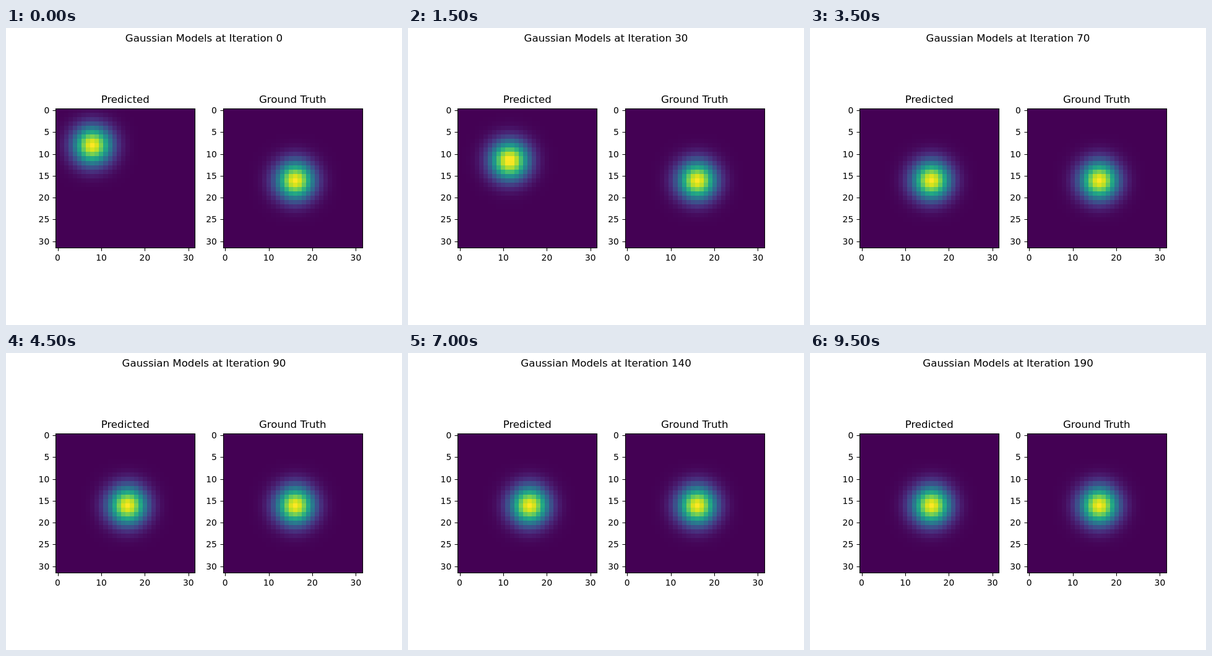
Recreate the animation shown at these times as an HTML page with a canvas. Size 640 px wide and 480 px high, loop 10000 ms.

```html
<!DOCTYPE html>
<html lang="en">
<head>
<meta charset="utf-8">
<title>Gaussian Models</title>
<style>
  html, body { margin: 0; width: 100%; height: 100%; overflow: hidden; background: #fff; }
  canvas, svg { position: absolute; left: 0; top: 0; display: block; }
  text { font: 13.889px "DejaVu Sans", sans-serif; fill: #000; text-anchor: middle; }
  .title { font-size: 16.667px; }
  .tick { text-anchor: end; }
  path { fill: none; stroke: #000; stroke-width: 1.11; }
</style>
</head>
<body>
<canvas id="maps" width="640" height="480"></canvas>
<svg id="axes" width="640" height="480" viewBox="0 0 640 480">
  <text id="head" class="title" x="320" y="22"></text>
</svg>
<script>
const STEP = 500, COUNT = 20, N = 32, SIGMA = 3;
const SIZE = 225.4545, CELL = SIZE / N, TOP = 129.67;
const LEFTS = [80, 350.545];
// Centre of the fitted blob at each step; it rests on 16 afterwards.
const FIT = [8, 9.03, 10.18, 11.45, 12.78, 14, 15.2, 15.97, 16.03, 16];
const VIRIDIS = ("440154 481a6c 472f7d 414487 39568c 31688e 2a788e 23888e " +
  "1f988b 22a884 35b779 54c568 7ad151 a5db36 d2e21b fde725").split(" ")
  .map(h => [0, 2, 4].map(i => parseInt(h.slice(i, i + 2), 16)));

const ctx = document.getElementById("maps").getContext("2d");
const svg = document.getElementById("axes");
const head = document.getElementById("head");

function add(tag, attrs, text = "") {
  const el = document.createElementNS("http://www.w3.org/2000/svg", tag);
  for (const k in attrs) el.setAttribute(k, attrs[k]);
  el.textContent = text;
  svg.append(el);
}

const snap = v => Math.round(v) + 0.5;

function drawAxes(left, title) {
  const x0 = snap(left), x1 = snap(left + SIZE);
  const y0 = snap(TOP), y1 = snap(TOP + SIZE);
  let d = `M${x0} ${y0}H${x1}V${y1}H${x0}Z`;
  for (let v = 0; v <= 30; v += 5) {
    const at = (v + 0.5) * CELL;
    const y = snap(TOP + at);
    d += `M${x0} ${y}h-5`;
    add("text", { class: "tick", x: left - 9.72, y: y + 4.5 }, v);
    if (v % 10 === 0) {
      d += `M${snap(left + at)} ${y1}v5`;
      add("text", { x: left + at, y: 376 }, v);
    }
  }
  add("path", { d });
  add("text", { class: "title", x: left + SIZE / 2, y: 121 }, title);
}

function color(v) {
  const p = v * (VIRIDIS.length - 1);
  const i = Math.min(Math.floor(p), VIRIDIS.length - 2);
  const mix = VIRIDIS[i].map((c, k) => Math.round(c + (VIRIDIS[i + 1][k] - c) * (p - i)));
  return `rgb(${mix})`;
}

function drawBlob(left, mu) {
  const line = Array.from({ length: N }, (_, i) => Math.exp(-((i - mu) ** 2) / (2 * SIGMA ** 2)));
  const peak = Math.max(...line);
  const edge = (from, i) => Math.round(Math.round(from) + i * CELL);
  for (let r = 0; r < N; r++) {
    const y = edge(TOP, r), h = edge(TOP, r + 1) - y;
    for (let c = 0; c < N; c++) {
      const x = edge(left, c);
      ctx.fillStyle = color(line[r] * line[c] / peak ** 2);
      ctx.fillRect(x, y, edge(left, c + 1) - x, h);
    }
  }
}

let shown = -1;
function render(now) {
  const step = Math.floor(now / STEP) % COUNT;
  if (step !== shown) {
    shown = step;
    head.textContent = `Gaussian Models at Iteration ${step * 10}`;
    drawBlob(LEFTS[0], FIT[Math.min(step, FIT.length - 1)]);
  }
}

function loop() {
  render(performance.now());
  requestAnimationFrame(loop);
}

drawAxes(LEFTS[0], "Predicted");
drawAxes(LEFTS[1], "Ground Truth");
drawBlob(LEFTS[1], 16);
loop();
</script>
</body>
</html>
```
